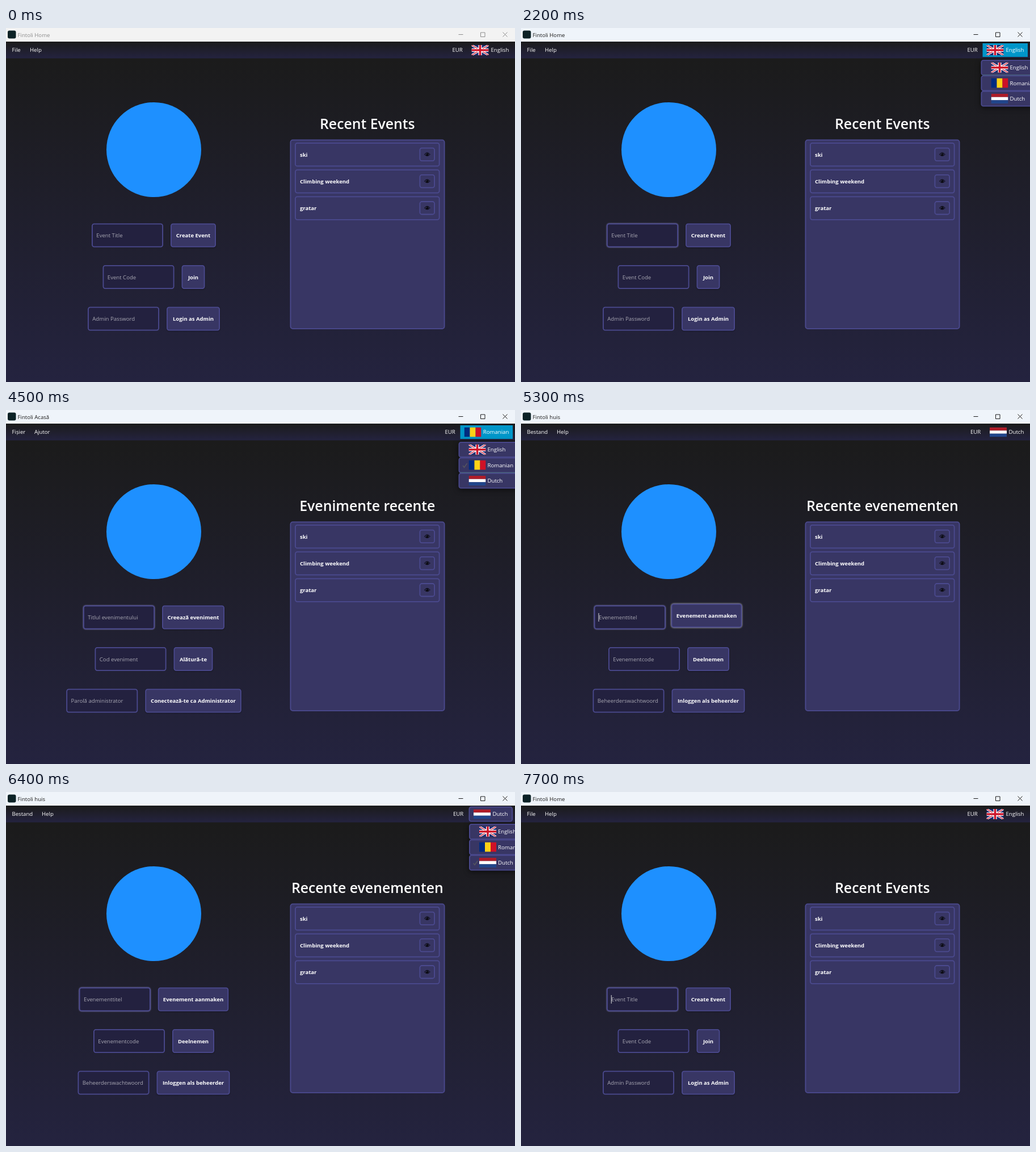
Recreate the animation shown at these times as an HTML page. Size 897 px wide and 624 px high, loop 8000 ms.

```html
<!DOCTYPE html>
<html lang="en">
<head>
<meta charset="utf-8">
<title>Fintoli</title>
<style>
  html, body { margin: 0; width: 100%; height: 100%; overflow: hidden; background: #1b1b1b; }
  svg { display: block; }
  text { font: 9.6px "Open Sans", "Noto Sans", sans-serif; fill: #fff; }
  .bold { font-weight: 700; font-size: 9.5px; }
  .heading { font-weight: 600; font-size: 24.8px; }
  .hint { fill: #a8a7b3; }
  .mid { text-anchor: middle; }
  .end { text-anchor: end; }
  .box { fill: #383664; stroke: #4b4a8f; stroke-width: 1.8; }
  .field { fill: #23213f; }
  .press { filter: drop-shadow(0 1px 1px #0005); }
  .focus { filter: drop-shadow(0 0 1.3px #8583b5); }
  .lift { transform: translate(-3px, -3px); filter: drop-shadow(.5px .5px 1.4px #d0d0d0); }
  .menu { filter: drop-shadow(0 2px 5px #0009); }
</style>
</head>
<body>
<svg width="897" height="624" viewBox="0 0 897 624">
  <defs>
    <linearGradient id="page" x2="0" y2="1">
      <stop stop-color="#1b1b1b"/><stop offset="1" stop-color="#24233f"/>
    </linearGradient>
    <symbol id="en" viewBox="0 0 60 36" preserveAspectRatio="none">
      <path fill="#1b2a70" d="M0 0h60v36H0z"/>
      <path stroke="#fff" stroke-width="7" d="M0 0L60 36M60 0L0 36"/>
      <path stroke="#cf142b" stroke-width="2.6" d="M0 0L60 36M60 0L0 36"/>
      <path stroke="#fff" stroke-width="12" d="M30 0V36M0 18H60"/>
      <path stroke="#cf142b" stroke-width="7" d="M30 0V36M0 18H60"/>
    </symbol>
    <symbol id="ro" viewBox="0 0 3 2" preserveAspectRatio="none">
      <path fill="#002b7f" d="M0 0h1v2H0z"/>
      <path fill="#fcd116" d="M1 0h1v2H1z"/>
      <path fill="#ce1126" d="M2 0h1v2H2z"/>
    </symbol>
    <symbol id="nl" viewBox="0 0 2 3" preserveAspectRatio="none">
      <path fill="#ae1c28" d="M0 0h2v1H0z"/>
      <path fill="#fff" d="M0 1h2v1H0z"/>
      <path fill="#21468b" d="M0 2h2v1H0z"/>
    </symbol>
    <g id="eye">
      <path fill="none" stroke="#0b0b12" d="M-5 0Q0-6 5 0Q0 5.4-5 0z"/>
      <circle r="2.5" fill="#0b0b12"/><circle cx="-.8" cy="-.9" r=".6" fill="#55538a"/>
    </g>
  </defs>
  <rect y="53" width="897" height="571" fill="url(#page)"/>
  <rect y="24" width="897" height="29.5" fill="url(#page)"/>
  <circle cx="260.5" cy="214.5" r="83.5" fill="#1e90ff"/>
  <g id="scene"></g>
</svg>
<script>
const LOOP = 8000, STEP = 100;

// Each row: placeholder, button label, button width
const LANGS = {
  en: { name: 'English', title: 'Home', file: 'File', help: 'Help', helpX: 42, flagX: 820.5,
    heading: 'Recent Events',
    rows: [['Event Title', 'Create Event', 80], ['Event Code', 'Join', 41],
           ['Admin Password', 'Login as Admin', 94]] },
  ro: { name: 'Romanian', title: 'Acasă', file: 'Fișier', help: 'Ajutor', helpX: 50, flagX: 807.5,
    heading: 'Evenimente recente',
    rows: [['Titlul evenimentului', 'Creează eveniment', 110], ['Cod eveniment', 'Alătură-te', 69],
           ['Parolă administrator', 'Conectează-te ca Administrator', 169.5]] },
  nl: { name: 'Dutch', title: 'huis', file: 'Bestand', help: 'Help', helpX: 63, flagX: 826,
    heading: 'Recente evenementen',
    rows: [['Evenementtitel', 'Evenement aanmaken', 124.5], ['Evenementcode', 'Deelnemen', 74],
           ['Beheerderswachtwoord', 'Inloggen als beheerder', 129]] }
};
const EVENTS = ['ski', 'Climbing weekend', 'gratar'];

const within = (t, ...spans) => spans.some(([from, to]) => t >= from && t < to);

function stateAt(t) {
  const lang = t < 2300 || t >= 7100 ? 'en' : t < 4600 ? 'ro' : 'nl';
  const active = t >= 1300;
  return {
    lang, active,
    caret: active && Math.floor((t - 1300) / 456) % 2 === 0,
    over: within(t, [1100, 1800], [3600, 4100], [6100, 6600]),
    open: within(t, [1400, 2300], [3800, 4600], [6400, 7100]),
    checked: t > 2300 ? lang : '',
    hoverLang: within(t, [1800, 2300], [4100, 4400], [6600, 7100]) ? 'en'
             : within(t, [4400, 4600]) ? 'ro' : '',
    hoverRow: within(t, [5300, 5400]) ? 0 : within(t, [3000, 3200]) ? 1 : -1,
    hoverEvent: within(t, [5400, 5500]) ? 1 : within(t, [5700, 5900]) ? 2 : -1
  };
}

const text = (x, y, label, cls = '', extra = '') =>
  `<text x="${x}" y="${y}" class="${cls}" ${extra}>${label}</text>`;
const box = (x, y, w, h, cls = '', r = 3.5) =>
  `<rect x="${x + .9}" y="${y + .9}" width="${w - 1.8}" height="${h - 1.8}" rx="${r}" class="box ${cls}"/>`;
const group = (cls, body) => `<g class="${cls}">${body}</g>`;
const flag = (id, x, cy) => {
  const h = id === 'en' ? 18 : 17;
  return `<use href="#${id}" x="${x}" y="${cy - h / 2}" width="30" height="${h}"/>`;
};

function titleBar(s, lang) {
  const ink = s.active ? '#1a1a1a' : '#8c8c8c';
  return `<rect width="897" height="24" fill="${s.active ? '#eff4fa' : '#f3f3f3'}"/>
    <rect x="3" y="4.5" width="14.5" height="14" rx="3" fill="#0c2226"/>
    ${text(20.5, 15.5, 'Fintoli ' + lang.title, '', `style="fill:${ink}"`)}
    <path fill="none" stroke="${ink}" d="M797.5 11.5h8M836.5 8h7.5v7.5h-7.5zM875.5 7.5l8 8M883.5 7.5l-8 8"/>`;
}

function menuBar(s, lang) {
  const shift = s.over ? 2 : 0, x = lang.flagX - shift;
  let button = '';
  if (s.over) button = box(lang.flagX - 10.5, 25.5, 903.5 - lang.flagX, 27);
  else if (s.open)
    button = `<rect x="${x - 7}" y="27" width="${900 - x}" height="24" fill="#0096c9"/>`;
  return text(10.5, 42, lang.file) + text(lang.helpX, 42, lang.help) + button
    + text(lang.flagX - 34 - 2 * shift, 42, 'EUR') + flag(s.lang, x, 39)
    + text(886.3 - shift, 42, lang.name, 'end');
}

function languageMenu(s, lang) {
  const x = lang.flagX - 10;
  const items = Object.entries(LANGS).map(([id, { name }], i) => {
    const y = 56 + 27.4 * i, cy = y + 13.7;
    return box(x, y, 125, 27.8)
      + (id === s.hoverLang ? `<path stroke="#47776f" d="M${x + 3} ${y + 27}H897"/>` : '')
      + (id === s.checked
        ? `<path fill="none" stroke="#55555f" stroke-width="1.6" d="M${x + 7.5} ${cy + 1}l2.5 3 5-7"/>` : '')
      + flag(id, x + 18, cy) + text(x + 51, cy + 3.6, name);
  });
  return group('menu', items.join(''));
}

function formRow(s, [hint, label, width], i) {
  const y = 344.5 + 73.5 * i, x = 260.5 - (139 + width) / 2, bx = x + 139;
  const focused = s.active && i === 0;
  return box(x, y, 126, 42, 'field' + (focused ? ' focus' : ''))
    + text(x + 8.3, y + 24.6, hint, 'hint')
    + (focused && s.caret ? `<rect x="${x + 7.7}" y="358" width="1" height="15" fill="#ddd"/>` : '')
    + group(s.hoverRow === i ? 'lift' : 'press',
        box(bx, y, width, 42) + text(bx + width / 2, y + 24.6, label, 'bold mid'));
}

function eventItem(s, name, i) {
  const y = 202 + 47.2 * i;
  return group(s.hoverEvent === i ? 'lift' : '',
    box(509, y, 255.5, 42.3) + text(518, y + 24.7, name, 'bold')
    + box(728.5, y + 8.7, 27.5, 24.3)
    + `<use href="#eye" x="742.3" y="${y + 20.8}"/>`);
}

function draw(s) {
  const lang = LANGS[s.lang];
  return titleBar(s, lang) + menuBar(s, lang)
    + lang.rows.map((row, i) => formRow(s, row, i)).join('')
    + text(636.8, 178, lang.heading, 'heading mid')
    + box(500.5, 196.5, 273, 334.5, '', 4)
    + EVENTS.map((name, i) => eventItem(s, name, i)).join('')
    + (s.open ? languageMenu(s, lang) : '');
}

const scene = document.getElementById('scene');
let shown = '';
function tick() {
  const t = Math.floor(performance.now() % LOOP / STEP) * STEP;
  const state = stateAt(t), key = JSON.stringify(state);
  if (key !== shown) {
    scene.innerHTML = draw(state);
    shown = key;
  }
  requestAnimationFrame(tick);
}
tick();
</script>
</body>
</html>
```
